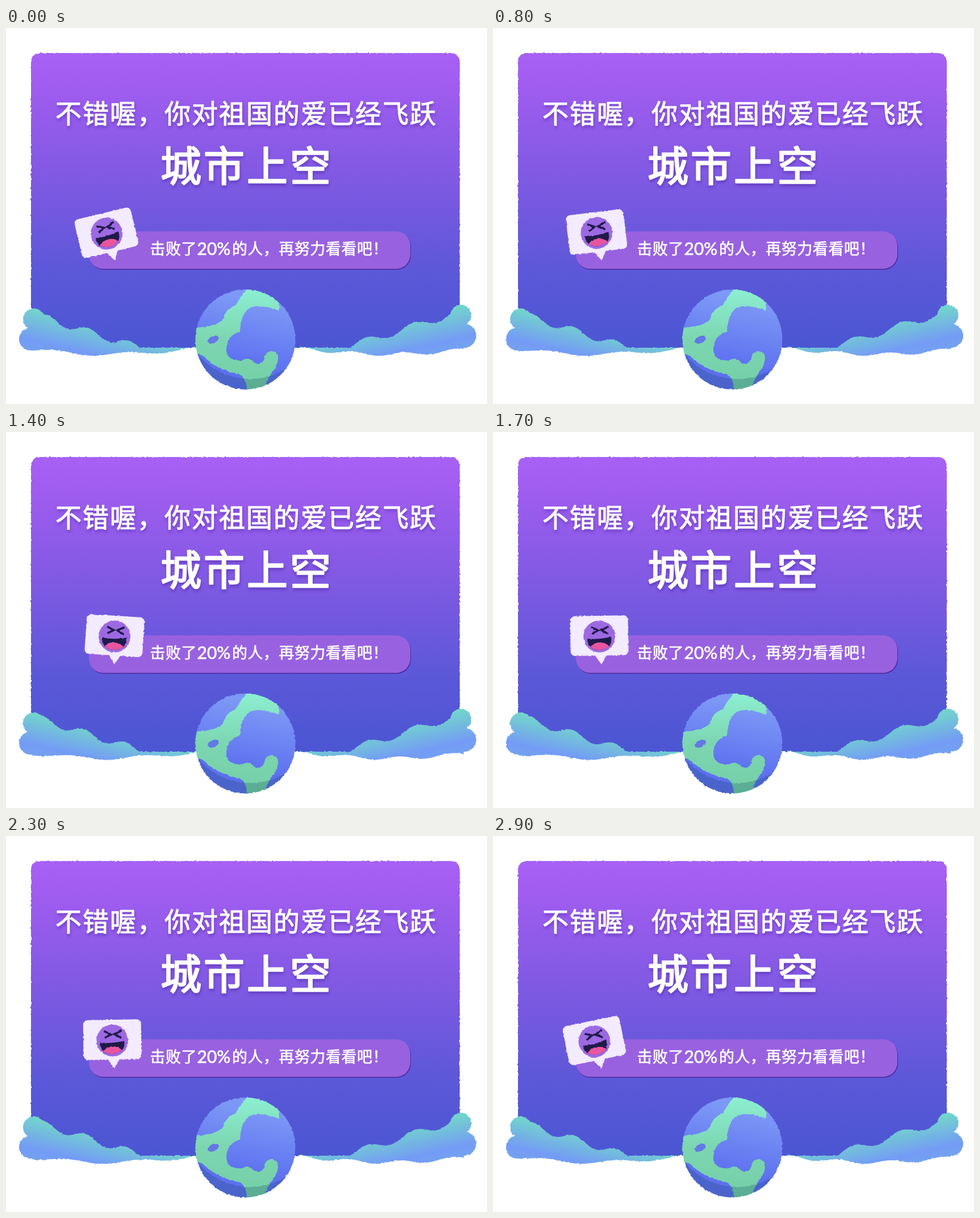
Animation of 847 by 661 pixels, one loop 3000 ms. Source, as an HTML page:

```html
<!DOCTYPE html>
<html lang="zh-CN">
<head>
<meta charset="utf-8">
<style>
  html, body { margin: 0; width: 100%; height: 100%; overflow: hidden; background: #fff; }
  svg { display: block; }
  text { font-family: "Noto Sans CJK SC", "Noto Sans CJK", sans-serif; fill: #fff; stroke: #fff; stroke-linejoin: round; }
  .title { filter: drop-shadow(1px 4px 2.5px rgba(62, 28, 150, .4)); }
  .line { font-size: 46px; letter-spacing: 2px; stroke-width: 1.1px; }
  .level { font-size: 72px; letter-spacing: 4px; stroke-width: 2.5px; }
  .note { font-size: 27px; letter-spacing: .5px; stroke-width: .7px; }
  .digits { font-family: Lato, sans-serif; font-size: 30px; letter-spacing: 0; }
</style>
</head>
<body>
<svg width="847" height="661" viewBox="0 0 847 661">
  <defs>
    <filter id="rough" filterUnits="userSpaceOnUse" x="0" y="0" width="847" height="661" color-interpolation-filters="sRGB">
      <feTurbulence id="noise" type="fractalNoise" baseFrequency=".25" numOctaves="1" result="n"/>
      <feDisplacementMap in="SourceGraphic" in2="n" scale="3.5" xChannelSelector="R" yChannelSelector="G"/>
    </filter>
    <linearGradient id="cardFill" x2="0" y2="1">
      <stop stop-color="#a761f4"/>
      <stop offset=".1" stop-color="#a15df0"/>
      <stop offset=".45" stop-color="#7d59e2"/>
      <stop offset=".75" stop-color="#5b58d8"/>
      <stop offset="1" stop-color="#4b56d2"/>
    </linearGradient>
    <linearGradient id="leftFill" gradientUnits="userSpaceOnUse" x1="60" y1="498" x2="44" y2="567">
      <stop stop-color="#72d4cc"/><stop offset=".75" stop-color="#749bf5"/><stop offset="1" stop-color="#73a2f0"/>
    </linearGradient>
    <linearGradient id="rightFill" href="#leftFill" gradientUnits="userSpaceOnUse" x1="790" y1="493" x2="806" y2="562"/>
    <linearGradient id="sea" x1=".6" x2=".4" y2="1">
      <stop offset=".1" stop-color="#7d99f6"/><stop offset=".75" stop-color="#5d70ef"/>
    </linearGradient>
    <linearGradient id="ground" x2="0" y2="1">
      <stop stop-color="#8df0d3"/><stop offset=".5" stop-color="#7cd5b0"/><stop offset="1" stop-color="#73cfa6"/>
    </linearGradient>
    <clipPath id="globe"><circle cx="421.5" cy="547.5" r="88"/></clipPath>
    <clipPath id="mouth"><path d="M-21 3Q0 6 21 1Q22 14 15 19Q0 28-15 19Q-22 13-21 3Z"/></clipPath>
  </defs>

  <g filter="url(#rough)">
    <path d="M44 562V61Q44 44 61 44H782Q799 44 799 61V562Z" fill="url(#cardFill)"/>
    <g fill="url(#leftFill)">
      <path id="left"/><circle cx="49" cy="512" r="19"/><circle cx="43" cy="547" r="20"/>
    </g>
    <g fill="url(#rightFill)">
      <path id="right"/><circle cx="801" cy="505" r="18.5"/><circle cx="807" cy="541" r="21"/>
    </g>
    <g clip-path="url(#globe)">
      <rect x="333" y="459" width="177" height="177" fill="url(#sea)"/>
      <path fill="url(#ground)" d="M428 455Q411 474 405 487Q386 494 382 513Q366 527 325 527V572Q345 571 354 583Q376 602 412 609
        Q425 616 424 642H454Q456 620 474 598Q487 570 467 568Q455 570 455 582Q447 597 433 585Q426 578 416 584
        Q390 586 388 567Q388 540 412 534Q414 488 444 489Q462 489 480 497Q486 480 462 458Z"/>
      <ellipse cx="365" cy="548" rx="10.5" ry="6" transform="rotate(-24 365 548)" fill="#6478e6"/>
      <path d="M320 450V650H530V450H550V497A120 120 0 0 1 310 497V450Z" fill="#10405a" opacity=".24"/>
    </g>
  </g>

  <g class="title">
    <text class="line" x="87" y="167">不错喔，你对祖国的爱已经飞跃</text>
    <text class="level" x="272" y="269">城市上空</text>
  </g>

  <rect x="147" y="359" width="566" height="66" rx="25" fill="#4c2a9c"/>
  <rect x="146" y="357.5" width="566" height="66" rx="25" fill="#9861e0"/>
  <g class="note">
    <text x="253.5" y="397.5">击败了</text>
    <text class="digits" x="336.5" y="398.5">20%</text>
    <text x="398" y="397.5">的人，再努力看看吧！</text>
  </g>

  <g filter="url(#rough)">
    <g id="bubble">
      <rect x="-54" y="-83.5" width="102" height="70" rx="8" fill="#f3ebff"/>
      <path d="M-12-15H10L0 2Z" fill="#f3ebff"/>
      <g transform="translate(-3 -47) rotate(-1)">
        <circle r="28" fill="#9c69e3"/>
        <path d="M-14-17L-2-11L-13-5M17-17L4-11L16-4" fill="none" stroke="#1f1a48" stroke-width="3.6"/>
        <g clip-path="url(#mouth)">
          <rect x="-24" y="-2" width="48" height="32" fill="#1f1a48"/>
          <ellipse cy="23" rx="18" ry="12.5" fill="#e9559f"/>
        </g>
      </g>
    </g>
  </g>
</svg>
<script>
const $ = id => document.getElementById(id);
const wave = (u, crest, period) => Math.cos((u - crest) / period * 2 * Math.PI);

// u runs from the outer edge of a cloud towards the globe
const clouds = {
  left: { x: u => 23 + u, base: 500, dip: 85, ripple: 73, belly: 127, swell: 125, sway: 1 },
  right: { x: u => 828 - u, base: 494, dip: 68, ripple: 84, belly: 173, swell: 90, sway: .3 }
};

function cloudPath(c, k) {
  const move = k * c.sway, top = [], bottom = [];
  for (let u = 22; u <= 310; u += 4) {
    const slope = c.base + 3.5 + .315 * (u - 26) - 3 * move;
    top.push([c.x(u), Math.min(562, slope + 6.5 * wave(u, c.dip - 8 * move, c.ripple))]);
    bottom.unshift([c.x(u), 563 + 10.5 * Math.sin(u / 310 * Math.PI) + 3 * wave(u, c.belly + 30 * move, c.swell)]);
  }
  return 'M' + [...top, ...bottom].join('L') + 'Z';
}

function draw(step) {
  const k = (1 - Math.cos(step / 5 * Math.PI)) / 2;
  $('noise').setAttribute('seed', step + 1);
  $('bubble').setAttribute('transform', `translate(191 406.5) rotate(${-13.4 + 19 * k})`);
  for (const id in clouds) $(id).setAttribute('d', cloudPath(clouds[id], k));
}

let last = -1;
function tick() {
  const step = Math.floor(performance.now() / 100) % 30;
  if (step !== last) draw(step);
  last = step;
  requestAnimationFrame(tick);
}
tick();
</script>
</body>
</html>
```
